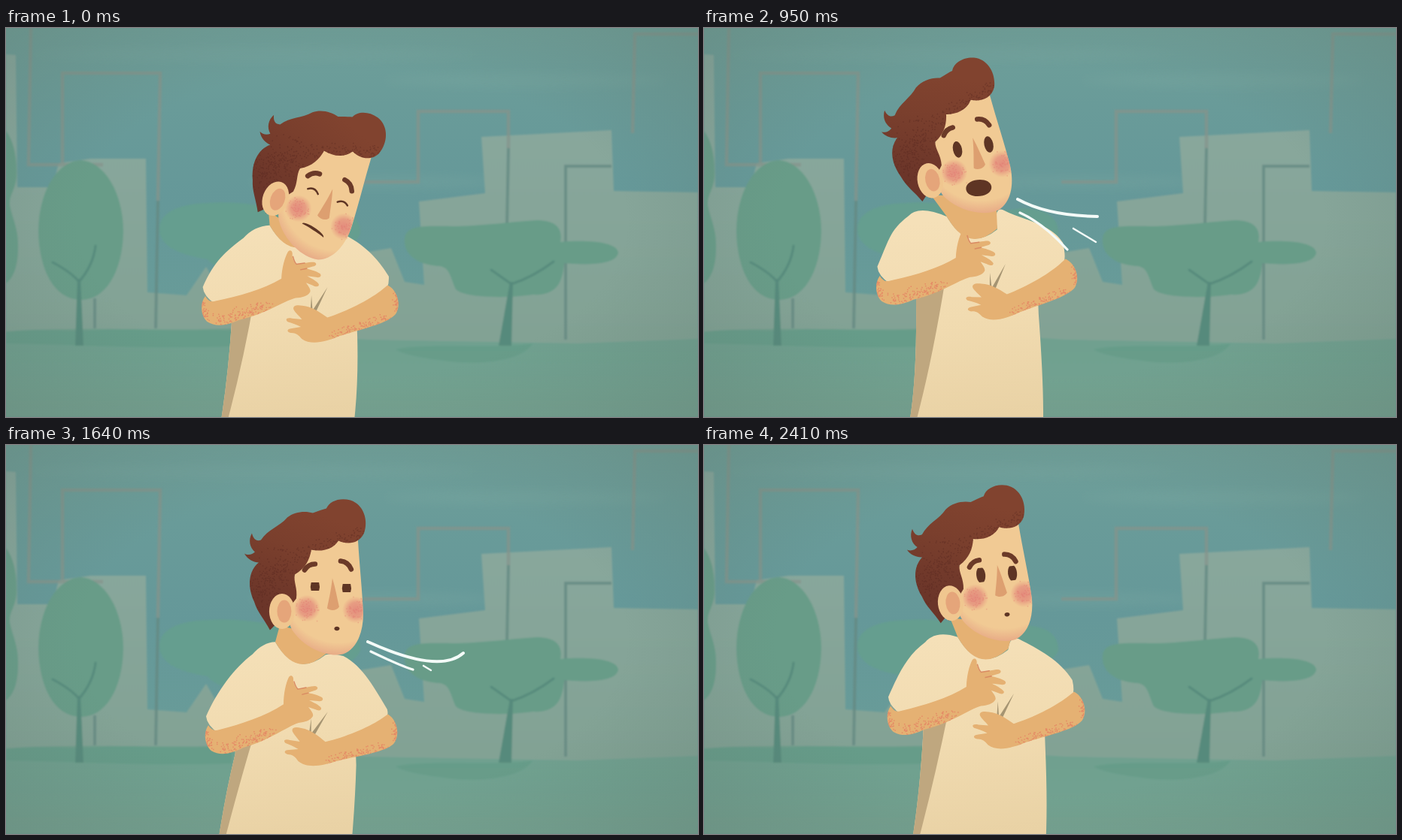
Animation, 920 px wide and 518 px high, one loop 2460 ms. Source, as an HTML page:

```html
<!DOCTYPE html>
<html lang="en">
<head>
<meta charset="utf-8">
<title>Short of breath</title>
<style>
  html, body { margin: 0; width: 100%; height: 100%; overflow: hidden; background: #6c9e95; }
  svg { display: block; width: 100vw; height: 100vh; }
  .line { fill: none; stroke-linecap: round; stroke-linejoin: round; }
  .frame { fill: none; stroke: #86938b; stroke-width: 4.5; opacity: .75; }
  .post { fill: none; stroke: #658a82; stroke-width: 4; opacity: .8; }
  .skin { fill: #e5b173; }
  .brow { stroke: #6b3a28; stroke-width: 6.5; }
  .dark { fill: #5e3524; }
  .wind { stroke: #f4fbf8; }
</style>
</head>
<body>
<svg viewBox="0 0 920 518" preserveAspectRatio="none">
  <defs>
    <linearGradient id="sky" x2="0" y2="1">
      <stop stop-color="#6f9f99"/><stop offset=".2" stop-color="#699b99"/>
      <stop offset=".45" stop-color="#659899"/><stop offset="1" stop-color="#6b9f98"/>
    </linearGradient>
    <linearGradient id="town" x2="0" y2="1">
      <stop stop-color="#8ba99f"/><stop offset="1" stop-color="#82a294"/>
    </linearGradient>
    <linearGradient id="grass" x2="0" y2="1">
      <stop stop-color="#6ea08f"/><stop offset="1" stop-color="#75a391"/>
    </linearGradient>
    <radialGradient id="edge" cx=".5" cy=".5" r=".72">
      <stop offset=".55" stop-color="#5e7a70" stop-opacity="0"/>
      <stop offset="1" stop-color="#5e7a70" stop-opacity=".4"/>
    </radialGradient>
    <linearGradient id="cloth" gradientUnits="userSpaceOnUse" x1="360" y1="250" x2="390" y2="518">
      <stop stop-color="#f5e0b8"/><stop offset=".5" stop-color="#f1dbb0"/><stop offset="1" stop-color="#e9d2a5"/>
    </linearGradient>
    <radialGradient id="faceFill" gradientUnits="userSpaceOnUse" cx="440" cy="190" r="98">
      <stop offset=".74" stop-color="#f1ca94"/><stop offset="1" stop-color="#e39c80"/>
    </radialGradient>
    <radialGradient id="blush">
      <stop stop-color="#e07d77" stop-opacity=".8"/><stop offset=".55" stop-color="#e28579" stop-opacity=".65"/>
      <stop offset="1" stop-color="#e6907c" stop-opacity="0"/>
    </radialGradient>
    <linearGradient id="hairFill" gradientUnits="userSpaceOnUse" x1="400" y1="85" x2="350" y2="215">
      <stop stop-color="#81432f"/><stop offset=".4" stop-color="#7a3f2d"/><stop offset="1" stop-color="#6b3529"/>
    </linearGradient>
    <filter id="soft" x="-30%" y="-60%" width="160%" height="220%"><feGaussianBlur stdDeviation="7"/></filter>
    <filter id="fuzz"><feGaussianBlur stdDeviation="1"/></filter>
    <clipPath id="inHair"><use href="#hair"/></clipPath>
    <clipPath id="inFace"><use href="#face"/></clipPath>
    <clipPath id="inArmL"><use href="#armL"/></clipPath>
    <clipPath id="inArmR"><use href="#armR"/></clipPath>
  </defs>

  <!-- town and park -->
  <rect width="920" height="518" fill="url(#sky)"/>
  <g filter="url(#soft)" fill="#7ba8a1" opacity=".3">
    <ellipse cx="330" cy="35" rx="300" ry="9"/><ellipse cx="690" cy="70" rx="190" ry="10"/>
    <ellipse cx="490" cy="205" rx="170" ry="9"/>
  </g>
  <g filter="url(#fuzz)">
    <path fill="url(#town)" d="M0 35L13 36 15 212 62 212 70 180 112 174 186 174 188 352 240 356 266 318 280 342 330 300H470L512 293 530 338 556 342 549 231 637 220 632 145 805 136 808 217 920 219V425H0Z"/>
    <path fill="#669f8e" opacity=".85" d="M204 270C202 245 232 234 268 233 330 228 380 250 420 240 455 240 472 252 471 274 462 296 420 304 390 322 340 330 285 330 268 308 232 302 206 292 204 270Z"/>
    <path class="frame" d="M33 0L30 182H129M75 182V60H205L202 230M475 205H548V111H668V160M833 140L836 8H920"/>
    <path class="post" d="M202 230L199 400M668 160L666 262M118 360V400M744 415V184H805"/>
    <path fill="url(#grass)" d="M0 405C40 399 70 405 110 403 160 398 210 405 280 402L480 415 640 418 760 420 920 414V518H0Z"/>
    <path fill="#629985" opacity=".6" d="M0 404C80 397 220 404 300 400V424C200 428 100 422 0 420ZM518 428C560 418 650 428 700 420 690 440 640 450 590 444 560 440 530 436 518 428Z"/>
    <g fill="#679c88">
      <path d="M99 176C134 178 156 225 156 271 155 325 132 362 100 362 64 362 44 322 43 271 43 223 65 178 99 176Z"/>
      <path d="M0 137C10 150 15 172 14 198 13 215 4 222 5 236 9 256 17 268 16 294 16 318 9 334 0 340Z"/>
      <path d="M530 280C532 261 560 264 600 264 640 263 670 258 705 256 735 256 740 270 737 285 770 282 812 284 814 299 812 316 770 316 742 313 740 335 735 357 700 355 670 360 610 360 598 348 590 330 590 318 575 317 545 315 528 300 530 280Z"/>
    </g>
    <g class="line" stroke="#578a7c" stroke-width="3">
      <path d="M62 312Q88 326 97 338 116 316 119 290M645 322L672 341Q700 332 728 311"/>
      <path fill="#578a7c" stroke="none" d="M95 334H99L103 423H92ZM670 338H674L672 423H655Z"/>
    </g>
  </g>
  <rect width="920" height="518" fill="url(#edge)"/>

  <!-- person -->
  <path id="shirt" fill="url(#cloth)"/>
  <path id="shade" fill="#bfa77f"/>
  <path id="neck" class="skin"/>
  <g id="right">
    <path fill="#a59472" d="M402 385L405 363 405 385ZM403 386L427 354 408 388Z"/>
    <path id="armR" class="skin" d="M507 357C519 364 524 384 515 396 504 408 465 413 438 420 420 426 400 430 388 420 384 414 380 411 374 411 368 409 369 405 376 405L388 404C382 400 376 398 371 396 367 392 371 390 377 392L390 394C387 389 382 385 380 380 379 375 384 374 392 376 405 378 415 387 424 394 450 388 480 375 497 364Z"/>
    <path id="rashR" fill="#e5705c" opacity=".6" clip-path="url(#inArmR)"/>
  </g>
  <g id="left">
    <path id="armL" class="skin" d="M268 372C272 378 276 380 282 378 312 370 344 360 368 344 368 330 371 316 375 308 378 304 382 307 381 313 382 318 384 321 386 324 394 323 404 320 410 320 415 321 414 325 409 326L400 329C406 330 414 332 419 335 422 338 419 341 414 340L402 339C408 342 415 345 418 349 419 353 414 353 410 351L401 348C405 353 408 357 407 360 404 366 396 368 388 369 372 374 350 392 314 402 298 410 284 413 272 406 263 398 261 382 268 372Z"/>
    <path class="line" stroke="#d98a62" stroke-width="1.5" d="M382 314Q384 321 387 324L398 322M401 329L393 331"/>
    <path id="rashL" fill="#e5705c" opacity=".6" clip-path="url(#inArmL)"/>
  </g>
  <g id="head">
    <path id="face" fill="url(#faceFill)" d="M382 172L404 128 466 126C468 160 472 195 473 225 473 251 463 272 446 278 425 283 395 269 380 248 370 235 372 200 382 172Z"/>
    <g id="features">
      <g clip-path="url(#inFace)">
        <circle cx="398" cy="217" r="18" fill="url(#blush)"/>
        <circle cx="463" cy="219" r="18" fill="url(#blush)"/>
        <path id="freckles" fill="#df6f6c" opacity=".35"/>
      </g>
      <path fill="#dd9f70" d="M432 177C430 195 427 206 425 217 430 221 438 220 441 215 438 202 436 190 432 177Z"/>
      <g transform="translate(409 188)"><path class="eye dark"/></g>
      <g transform="translate(451 190)"><path class="eye dark"/></g>
      <path id="lids" class="line" stroke="#5e3524" stroke-width="2.5" d="M401 188Q409 182 416 190M444 191Q451 185 458 191"/>
    </g>
    <path id="brows" class="line brow" d="M395 166Q400 158 409 158M443 154Q453 155 457 165"/>
    <path id="mouth" class="dark"/>
    <path id="hair" fill="url(#hairFill)" d="M349 246C342 232 332 222 328 208 319 188 320 168 334 156 328 156 319 152 315 144 320 147 326 145 329 142 322 136 320 126 325 117 327 125 331 128 337 126 346 112 362 108 372 96 382 88 396 87 406 90 414 87 420 85 424 84 428 74 442 69 456 73 474 79 480 100 474 117 467 132 451 132 440 127 432 139 418 142 404 139 402 152 396 164 382 172 380 182 386 190 384 204L370 222 360 244Q357 238 355 240Z"/>
    <path id="grain" fill="#56261f" opacity=".4" clip-path="url(#inHair)"/>
    <ellipse cx="365" cy="221" rx="17" ry="23.5" fill="#f0c68f"/>
    <ellipse cx="368" cy="221" rx="9.5" ry="15" fill="#e5a57a"/>
  </g>
  <g id="breath" class="line wind"></g>
</svg>
<script>
const LOOP = 2460, STEP = LOOP / 54;
const $ = id => document.getElementById(id);
const set = (el, attrs) => { for (const k in attrs) el.setAttribute(k, attrs[k]); };
const clamp = v => Math.max(0, Math.min(1, v));
const mix = (a, b, u) => a + (b - a) * u;
const ramp = (t, from, to) => clamp((t - from) / (to - from));
const ease = (t, from, to) => { const u = ramp(t, from, to); return u * u * (3 - 2 * u); };

// Everything follows one lean (0 = far back, 1 = forward) and a fading cough
function mood(t) {
  const recoil = .92 * (1 - ramp(t, 0, 950)) ** 2.3;
  const exhale = 1.03 * ease(t, 950, 1610) * (1 - ease(t, 2000, 2740));
  const lean = recoil + exhale;
  return {
    lean, back: 1 - lean,
    cough: 1 - ramp(t, 0, 700),
    inhale: ease(t, 0, 950),
    gasp: 1 - ease(t, 950, 1580),
    tired: ease(t, 1650, 1950)
  };
}

const vec = (x, y) => ({ x, y });
const scale = (p, k, m = k) => vec(p.x * k, p.y * m);
const at = (x, y, o) => `${(x + o.x).toFixed(1)} ${(y + o.y).toFixed(1)} `;
const place = (p, cx, cy) => `translate(${p.x} ${p.y}) rotate(${p.turn} ${cx} ${cy})`;

// Offset of a point after turning about a pivot and shifting
function carry(px, py, cx, cy, p) {
  const a = p.turn * Math.PI / 180, c = Math.cos(a), s = Math.sin(a), x = px - cx, y = py - cy;
  return vec(cx + x * c - y * s + p.x - px, cy + x * s + y * c + p.y - py);
}

function drawBody({ back, cough }) {
  // Shift of each part: a share of the lean plus a share of the cough
  const shift = (x, y, cx, cy) => vec(x * back + cx * cough, y * back + cy * cough);
  const l = { ...shift(-33, -36, 1, -5), turn: 2.3 * back + 2.5 * cough };
  const r = { ...shift(-21, -33, 5, -2), turn: -7 * back - 3.6 * cough };
  const H = { ...shift(-64, -18, -2, 8), turn: 20.5 * cough - 12 * Math.max(0, back) ** 1.2 };
  const S = shift(-55, -27, -6, 4), N = shift(-50, -38, 5, -3), B = shift(-9, 0, 4, 0);
  const L = carry(266, 380, 420, 338, l), A = carry(503, 362, 370, 393, r);
  const R = scale(carry(519, 385, 370, 393, r), 1.25);
  const C = scale(S, .62, .4), W = scale(R, .7);
  const pit = vec(S.x * .4, L.y), fold = vec(S.x * .2, L.y);

  set($('left'), { transform: place(l, 420, 338) });
  set($('right'), { transform: place(r, 370, 393) });
  set($('head'), { transform: place(H, 366, 222) });
  set($('shirt'), { d: 'M' + at(357, 262, C) + 'Q' + at(340, 262, S) + at(326, 278, S)
    + 'C' + at(302, 296, S) + at(280, 326, L) + at(265, 360, L) + 'Q' + at(266, 372, L) + at(282, 383, L)
    + 'L' + at(304, 390, pit) + 'L' + at(304, 410, pit) + 'Q' + at(292, 462, B) + at(283, 520, B)
    + 'L' + at(460, 520, B) + 'Q' + at(464, 470, scale(B, 1.4)) + at(465, 425, W) + 'L' + at(464, 395, W)
    + 'L' + at(500, 367, A) + 'Q' + at(509, 362, A) + at(506, 350, R)
    + 'C' + at(490, 324, R) + at(474, 294, N) + at(447, 280, N)
    + 'Q' + at(435, 276, N) + at(424, 279, C) + 'Q' + at(385, 310, C) + at(357, 262, C) + 'Z' });
  set($('shade'), { d: 'M' + at(304, 390, pit) + 'L' + at(332, 376, fold)
    + 'Q' + at(313, 440, B) + at(292, 520, B) + 'L' + at(283, 520, B)
    + 'Q' + at(292, 462, B) + at(304, 410, pit) + 'Z' });
  const jaw = carry(362, 240, 366, 222, H), chin = carry(446, 260, 366, 222, H);
  set($('neck'), { d: 'M' + at(362, 240, jaw) + 'L' + at(357, 262, C) + 'Q' + at(385, 312, C)
    + at(424, 278, C) + 'L' + at(446, 260, chin) + 'Z' });
}

function drawFace(t, { lean, cough, inhale, gasp, tired }) {
  const brow = 10 * tired + 12 * (1 - ease(t, 0, 360));
  const open = (11 - 5.5 * ease(lean, .65, 1) * (1 - cough) - .15 * brow) * ramp(t, 20, 200);
  const h = Math.min(open, 10.99), w = 6 * Math.sqrt(1 - (h / 11) ** 2);
  document.querySelectorAll('.eye').forEach(e => set(e, {
    d: `M${-w} ${-h}H${w}A6 11 0 0 1 ${w} ${h}H${-w}A6 11 0 0 1 ${-w} ${-h}Z`
  }));
  set($('lids'), { visibility: h < 1.5 ? 'visible' : 'hidden' });
  set($('features'), { transform: `translate(0 ${6 * (1 - ease(t, 0, 360))})` });
  set($('brows'), { transform: `translate(0 ${brow})` });

  // An oval that flattens into a frown while coughing
  const mw = 3.5 + 13.5 * gasp, mh = 1.33 * (2.7 + gasp * (1.8 + 6.5 * inhale));
  const sag = mh * (1 - 1.2 * cough ** 2);
  set($('mouth'), {
    d: `M${-mw} 0C${-mw} ${-mh} ${mw} ${-mh} ${mw} 0C${mw} ${sag} ${-mw} ${sag} ${-mw} 0Z`,
    transform: `translate(${438 - 12 * gasp} 244) rotate(${7 * gasp + 6 * cough})`
  });
}

// Breath strokes: start, end and bend
const INHALE = [[417, 228, 523, 251, 13], [420, 246, 483, 295, -8], [491, 267, 521, 285, 0]];
const EXHALE = [[481, 262, 608, 277, 32], [485, 275, 541, 299, 2], [555, 294, 565, 300, 0]];
const CURL = [[588, 298, 643, 290, 32], [588, 312, 598, 347, -17], [551, 331, 552, 331, 0]];
const strokes = INHALE.map(() => {
  const p = document.createElementNS('http://www.w3.org/2000/svg', 'path');
  p.setAttribute('pathLength', 1);
  return $('breath').appendChild(p);
});

function drawBreath(t) {
  const inward = t < 1300, skew = inward ? .4 : .78, curl = ramp(t, 1640, 2000);
  const from = inward ? 1 - ramp(t, 730, 920) : ramp(t, 2010, 2150);
  const to = inward ? 1 - ramp(t, 980, 1150) : ramp(t, 1460, 1630);
  strokes.forEach((el, i) => {
    const [x, y, x2, y2, bend] = inward ? INHALE[i] : EXHALE[i].map((v, k) => mix(v, CURL[i][k], curl));
    const k = bend / Math.hypot(x2 - x, y2 - y);
    const cx = mix(x, x2, skew) - (y2 - y) * k, cy = mix(y, y2, skew) + (x2 - x) * k;
    set(el, {
      d: `M${x} ${y}Q${cx} ${cy} ${x2} ${y2}`,
      'stroke-width': mix(4 - .8 * i, 2.2, curl),
      'stroke-dasharray': `0 ${from} ${to - from} 2`,
      visibility: to - from > .001 ? 'visible' : 'hidden'
    });
  });
}

// Seeded speckles scattered along a segment
let seed = 7;
const rand = () => (seed = seed * 16807 % 2147483647) / 2147483647;
const bell = spread => (rand() + rand() - 1) * spread;
function speckle(count, x0, y0, x1, y1, spread) {
  let d = '';
  while (count--) {
    const u = rand();
    d += `M${(mix(x0, x1, u) + bell(spread)).toFixed(1)} ${(mix(y0, y1, u) + bell(spread)).toFixed(1)}h1.5v1.5h-1.5z`;
  }
  return d;
}
set($('rashL'), { d: speckle(150, 285, 404, 352, 382, 11) + speckle(45, 264, 380, 270, 400, 6) });
set($('rashR'), { d: speckle(130, 428, 418, 505, 400, 9) + speckle(45, 515, 368, 517, 392, 6) });
set($('grain'), { d: speckle(280, 325, 205, 375, 150, 30) + speckle(140, 385, 148, 472, 116, 14) });
set($('freckles'), { d: speckle(60, 398, 217, 398, 217, 18) + speckle(60, 463, 219, 463, 219, 18) });

function draw(now) {
  const t = Math.floor(now % LOOP / STEP + .15) % 54 * STEP;
  const m = mood(t);
  drawBody(m);
  drawFace(t, m);
  drawBreath(t);
  requestAnimationFrame(draw);
}
draw(performance.now());
</script>
</body>
</html>
```
